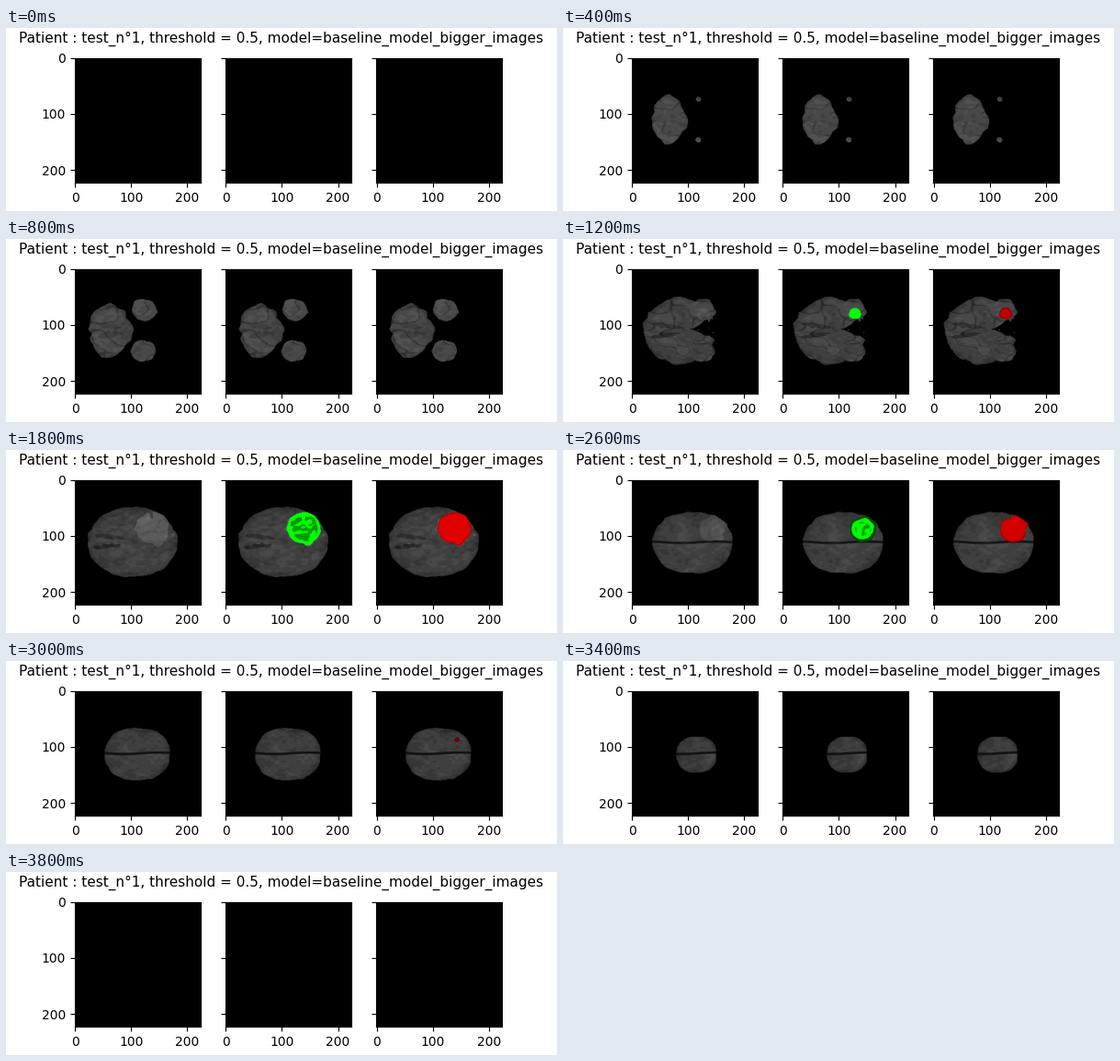
These frames come from a looping animation (600 px wide and 200 px high, 4 s). A matplotlib script:

```python
import numpy as np
import matplotlib.pyplot as plt
from matplotlib.animation import FuncAnimation

FRAMES, STEP_MS = 20, 200
N = 224
SCALE = 136.76 / N  # stage pixels per image pixel
MID = 100.5         # line between the two halves
TITLE = ("Patient : test_n°1, threshold = 0.5, "
         "model=baseline_model_bigger_images")

# Grid in stage coordinates of the first panel
axis = (np.arange(N) + 0.5) * SCALE
X, Y = np.meshgrid(75 + axis, 32.6 + axis)


def ramp(k, start, end):
    """Smooth step from 0 to 1."""
    t = np.clip((k - start) / (end - start), 0, 1)
    return t * t * (3 - 2 * t)


def dome(k, peak, before, after):
    """Half ellipse over the slices: 1 at the peak, 0 at both ends."""
    z = (k - peak) / (before if k < peak else after)
    return np.sqrt(max(0, 1 - z * z))


def noise(seed, dx, dy):
    """Bilinear value noise with cells of dx by dy stage pixels."""
    grid = np.random.default_rng(seed).random((80, 80))
    u, v = (X - 75) / dx, (Y - 32.6) / dy
    i, j = u.astype(int), v.astype(int)
    u, v = u - i, v - j
    top = grid[j, i] * (1 - u) + grid[j, i + 1] * u
    low = grid[j + 1, i] * (1 - u) + grid[j + 1, i + 1] * u
    return top * (1 - v) + low * v - 0.5


FINE = [noise(s, 4, 2.5) for s in (1, 2, 3)]
WIDE = [noise(s, 14, 9) for s in (4, 5, 6)]
EDGE = [noise(s, 6, 6) for s in (7, 8, 9)]


def drift(fields, k):
    """Texture that changes gradually from slice to slice."""
    w = np.cos(k * 0.45 + np.arange(3) * 2 * np.pi / 3)
    return sum(a * f for a, f in zip(w, fields))


def ellipse(cx, cy, rx, ry, rough=0):
    if min(rx, ry) < 0.5:
        return np.zeros_like(X, bool)
    return ((X - cx) / rx) ** 2 + ((Y - cy) / ry) ** 2 + rough < 1


def brain(k):
    """Mask of the slice and its depth from the outline."""
    low = 1 - ramp(k, 4, 7)  # 1 where the parts are still separate
    rough = drift(EDGE, k)
    size = dome(k, 6, 7.5, 12.05)
    left = 148 - 61 * size
    right = 148 + 39 * dome(k, 10, 6, 8.05)
    right += low * (133 + 1.5 * k - right)
    top = 97 - 35 * size * (1 - 0.2 * low)
    bottom = 98 + 42 * size ** 0.6 * (1 - 0.2 * low)

    rx, ry = (right - left) / 2, (bottom - top) / 2
    u = (X - left - rx) / rx
    v = (Y - top - ry) / ry / (1 - 0.3 * low * np.clip(u, 0, 1))
    p = 1.8 + 0.5 * ramp(k, 6, 12)
    d = np.abs(u) ** p + np.abs(v) ** p
    mask = d + (0.1 + 0.2 * low) * rough < 1

    r = 14 * (1 - ((k - 5) / 3.4) ** 2)
    for y in (MID - 22, MID + 22):
        lobe = ellipse(145 + 1.2 * k, y, r, r, 0.6 * rough)
        mask |= lobe
        d = np.where(lobe, 0.5, d)

    # Open wedge at the front that closes towards the upper slices
    tip = 138 + 22 * max(0, k - 6)
    wedge = np.abs(Y - 99) < 0.42 * (X - tip) * (1 + 0.8 * rough)
    mask &= ~wedge | (drift(FINE, k) > 0.42)
    return mask, np.clip(d, 0, 1), low


def bulge(k, span):
    """Size of the lesion, 0 to 1."""
    return max(0, 1 - ((k - 10) / span) ** 2)


def lesion(k, radius, rough):
    near = np.exp((6 - k) / 1.8)
    return ellipse(163 - 9 * near, 86.5 - 4 * near, radius, 0.93 * radius,
                   rough)


def lesion_radius(k, span):
    return 19 * bulge(k, span) ** (1 if k < 10 else 0.5)


def grey_slice(k):
    mask, d, low = brain(k)
    fine, wide = drift(FINE, k), drift(WIDE, k)
    g = 70 + 6 * low - 0.5 * k + 14 * wide + 15 * fine - 14 * d ** 5
    # Thin folds along the zero lines of the wide texture
    fold = np.clip(1 - np.abs(wide) / 0.05, 0, 1)
    g -= 24 * fold * (1 - ramp(k, 6, 11))
    # Dark hollows beside the middle line
    for side in (-1, 1):
        hollow = ellipse(112, MID + side * (4 + (120 - X) / 8), 15, 2.6, fine)
        g -= 22 * hollow * ramp(k, 3, 5) * (1 - ramp(k, 9, 12))
    # Gap between the halves in the upper slices
    line = MID + 0.8 + 0.8 * np.sin((X - 110) / 12)
    gap = np.clip(1.7 - np.abs(Y - line), 0, 0.85)
    g *= 1 - gap * ramp(k, 8, 15)
    g += 26 * bulge(k, 4.95) * lesion(k, lesion_radius(k, 4.95),
                                      1.1 * drift(EDGE, k + 1))
    return np.where(mask, np.clip(np.round(g / 9) * 9, 18, 130), 0)


def tint(grey, channel, layers):
    """Lay flat tones of one colour channel over the grey slice."""
    img = np.repeat(grey[..., None], 3, axis=2)
    for mask, tone in layers:
        mask = mask & (grey > 0)
        img[mask] = 0
        img[mask, channel] = tone
    return img.astype(np.uint8)


def panels(k):
    if k in (0, FRAMES - 1):
        return [np.zeros((N, N, 3), np.uint8)] * 3
    grey = grey_slice(k)
    rough, patch = drift(EDGE, k), drift(FINE, k)

    core = 19 * bulge(k, 4.95)
    truth = [(lesion(k, lesion_radius(k, 4.95), 0.5 * rough), 72),
             (lesion(k, core, 0.5 * rough), 255),
             (lesion(k, core - 4, 0.5 * rough) & (patch > -0.02)
              & (core > 8), 155)]

    r = lesion_radius(k, 5.05)
    tone = 225 * bulge(k, 5.05) ** 0.15
    guess = [(lesion(k, r, 0.6 * rough), tone * 0.78),
             (lesion(k, r - 1.5, 0.6 * rough), tone)]
    return [tint(grey, 0, []), tint(grey, 1, truth), tint(grey, 0, guess)]


fig, axes = plt.subplots(1, 3, figsize=(6, 2), dpi=100, sharey=True)
fig.suptitle(TITLE, fontsize=11)
images = []
for ax in axes:
    images.append(ax.imshow(np.zeros((N, N, 3), np.uint8)))
    ax.set_xticks([0, 100, 200])
    ax.set_yticks([0, 100, 200])


def update(k):
    for image, data in zip(images, panels(k)):
        image.set_data(data)
    return images


anim = FuncAnimation(fig, update, frames=FRAMES, interval=STEP_MS,
                     repeat=True, repeat_delay=0, blit=False)
plt.show()
```
